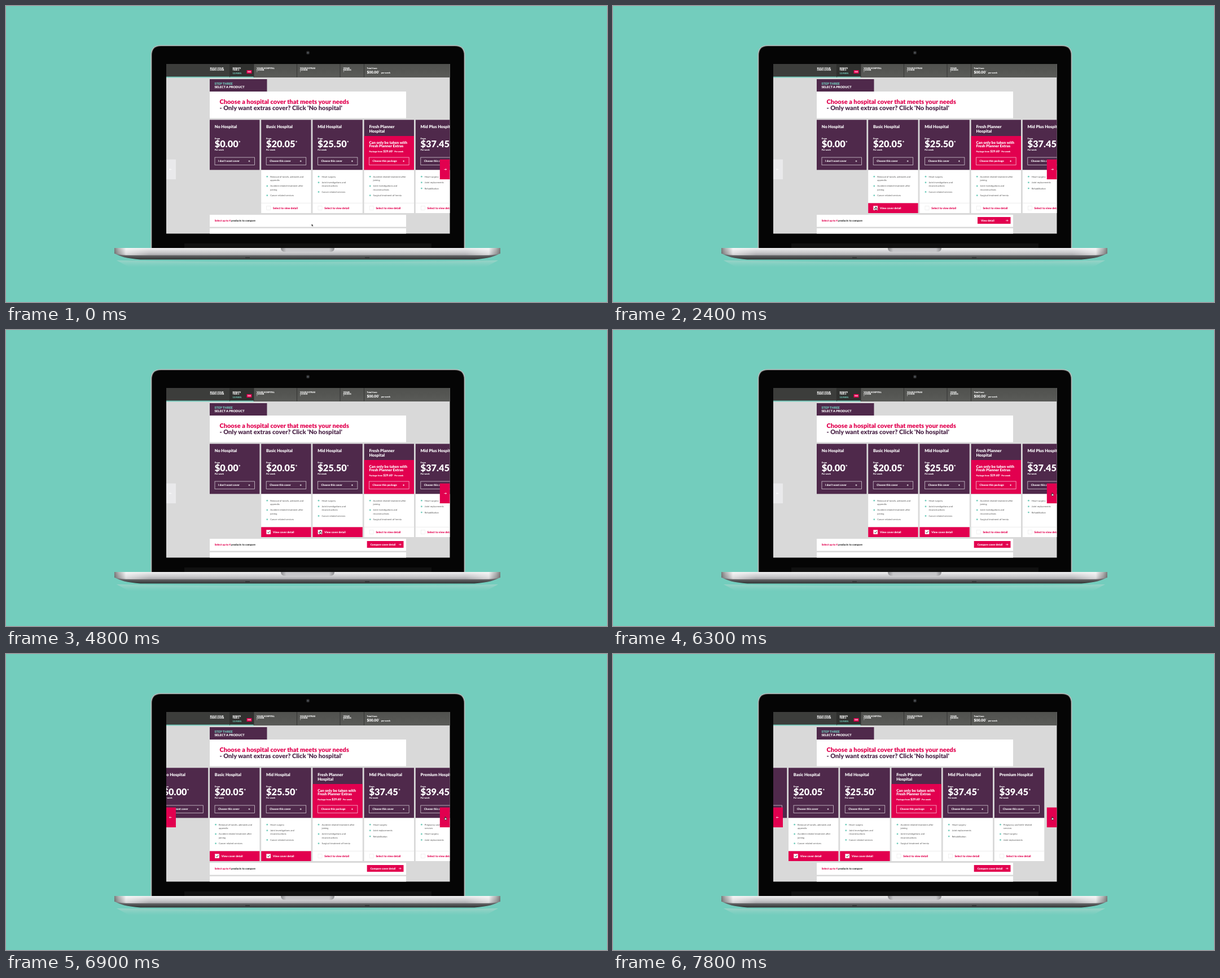
An HTML page for the animation above (8000 ms loop, 1065 by 526 pixels).

```html
<!DOCTYPE html>
<html lang="en">
<head>
<meta charset="utf-8">
<title>Cover picker</title>
<style>
  html, body { margin: 0; width: 100%; height: 100%; overflow: hidden; background: #73cdbd; }
  svg { display: block; }
  text { font-family: Lato, "Open Sans", sans-serif; text-rendering: geometricPrecision; white-space: pre; }
</style>
</head>
<body>
<svg id="stage" width="1065" height="526" viewBox="0 0 1065 526">
  <defs>
    <linearGradient id="metal" x1="0" y1="0" x2="0" y2="1">
      <stop offset="0" stop-color="#f2f2f3"/><stop offset=".3" stop-color="#dcdcde"/>
      <stop offset=".7" stop-color="#c3c3c6"/><stop offset="1" stop-color="#a2a2a6"/>
    </linearGradient>
    <linearGradient id="ends">
      <stop offset="0" stop-color="#555" stop-opacity=".75"/><stop offset=".012" stop-color="#777" stop-opacity=".45"/>
      <stop offset=".03" stop-color="#fff" stop-opacity=".5"/><stop offset=".09" stop-color="#fff" stop-opacity="0"/>
      <stop offset=".91" stop-color="#fff" stop-opacity="0"/><stop offset=".97" stop-color="#fff" stop-opacity=".5"/>
      <stop offset=".988" stop-color="#777" stop-opacity=".45"/><stop offset="1" stop-color="#555" stop-opacity=".75"/>
    </linearGradient>
    <linearGradient id="under" x1="0" y1="0" x2="0" y2="1">
      <stop offset="0" stop-color="#858589"/><stop offset="1" stop-color="#303333"/>
    </linearGradient>
    <linearGradient id="glow" x1="0" y1="0" x2="0" y2="1">
      <stop offset="0" stop-color="#b5d6ce" stop-opacity=".6"/><stop offset="1" stop-color="#9bd8cb" stop-opacity="0"/>
    </linearGradient>
    <linearGradient id="notch">
      <stop offset="0" stop-color="#8b8b8e"/><stop offset=".1" stop-color="#c6c6c9"/>
      <stop offset=".9" stop-color="#c6c6c9"/><stop offset="1" stop-color="#8b8b8e"/>
    </linearGradient>
    <linearGradient id="bar" x1="0" y1="0" x2="0" y2="1">
      <stop offset="0" stop-color="#50514e"/><stop offset="1" stop-color="#5a5b58"/>
    </linearGradient>
    <clipPath id="screen"><rect x="284" y="103" width="502.5" height="301.5"/></clipPath>
  </defs>
  <g id="laptop"></g>
  <g id="page" clip-path="url(#screen)">
    <g id="layout"></g>
    <g id="cards"></g>
    <g id="compare"></g>
    <g id="arrows"></g>
    <g id="pointer"></g>
  </g>
</svg>
<script>
const PINK = '#e2004f', PURPLE = '#4f294b', TEAL = '#73cdbd', WHITE = '#fff';
const LOOP = 8000, STEP = 300, PITCH = 91.2, CARD = 88.4;
const FIRST_CHECK = 1500, SECOND_CHECK = 3600, SLIDE = 6600;

const $ = id => document.getElementById(id);
const rect = (x, y, w, h, fill, extra = '') =>
  `<rect x="${x}" y="${y}" width="${w}" height="${h}" fill="${fill}" ${extra}/>`;
const text = (x, y, size, fill, str, weight = 900) =>
  `<text x="${x}" y="${y}" font-size="${size}" fill="${fill}" font-weight="${weight}">${str}</text>`;
const line = (d, color, width = 0.8) =>
  `<path d="${d}" fill="none" stroke="${color}" stroke-width="${width}"/>`;
const star = size => `<tspan font-size="${size * 0.6}" dy="${-size * 0.25}">*</tspan>`;
const arrow = (x, y, dir, color) =>
  line(`M${x - 2 * dir} ${y}h${4 * dir}m${-1.5 * dir} -1.5l${1.5 * dir} 1.5l${-1.5 * dir} 1.5`, color, 0.75);

// Lid outline: rounded at the top, square where it meets the base.
const lid = (inset, fill) => {
  const left = 256.5 + inset, top = 69.5 + inset, r = 18 - inset;
  return `<path d="M${left} 430V${top + r}q0 ${-r} ${r} ${-r}H${1070 - left - r}q${r} 0 ${r} ${r}V430Z" fill="${fill}"/>`;
};

function drawLaptop() {
  const base = 'M192 430H876V440Q866 443 846 443H222Q202 443 192 440Z';
  return lid(0, '#b4b9b8') + lid(1.6, '#2a2b2b') + lid(2.6, '#050505')
    + rect(316, 422, 438, 8, '#101010')
    + '<circle cx="535" cy="83" r="3.2" fill="#262626"/><circle cx="535" cy="83" r="1.5" fill="#555b62"/>'
    + '<path d="M196 452Q535 458 872 452L850 464H218Z" fill="url(#glow)"/>'
    + '<path d="M192 439Q204 448 238 450.5H830Q864 448 876 439Z" fill="url(#under)"/>'
    + `<path d="${base}" fill="url(#metal)"/><path d="${base}" fill="url(#ends)"/>`
    + '<path d="M487 430H582Q582 437 574 437H495Q487 437 487 430Z" fill="url(#notch)"/>'
    + rect(424, 446.5, 8, 1.5, '#2c2f2f') + rect(636, 446.5, 8, 1.5, '#2c2f2f');
}

function drawLayout() {
  const labels = [
    [361.5, 'BUILD YOUR', 'OWN COVER'], [401.5, 'REBATE', 'TIER 2'],
    [444, 'YOUR HOSPITAL', 'COVER', '*'], [520.8, 'YOUR EXTRAS', 'COVER', '*'],
    [597.5, 'YOUR', 'EXCESS', '*']
  ];
  let out = rect(284, 103, 503, 302, '#d9d9d9')
    + rect(284, 103, 503, 24, 'url(#bar)')
    + rect(284, 103, 112.5, 23, '#3c3d3b') + rect(396.5, 103, 42.5, 23, '#30312f')
    + rect(284, 125.5, 155, 1.8, TEAL);
  for (const x of [396.5, 439, 515.5, 592, 634.5]) out += line(`M${x} 103V126.5`, '#2c2d2b', 0.8);
  for (const [x, ...rows] of labels)
    rows.forEach((row, i) => out += text(x, 111.5 + i * 3.8, 4, WHITE, row));
  out += text(401.5, 120.6, 4, TEAL, '13.985%')
    + rect(426.5, 114, 9, 6, PINK) + text(428.2, 118.3, 3.4, WHITE, 'Edit')
    + text(639.5, 111.5, 3.9, WHITE, 'Total from')
    + text(639.5, 119.8, 6.5, WHITE, '$00.00' + star(6.5))
    + text(664.8, 119.8, 3.9, WHITE, 'per week')
    + rect(361, 130, 101.5, 22, PURPLE)
    + text(369.5, 140.3, 5.65, TEAL, 'STEP THREE') + text(369.5, 145.8, 5.65, WHITE, 'SELECT A PRODUCT')
    + rect(361, 152, 348, 47.3, WHITE)
    + text(378.5, 174, 11, PINK, 'Choose a hospital cover that meets your needs')
    + text(378.5, 185, 11, PURPLE, "- Only want extras cover? Click 'No hospital'")
    + rect(361, 371, 348, 21.5, WHITE) + rect(361, 395, 348, 12, WHITE)
    + text(369.8, 382.8, 4.6, PINK, 'Select up to 4<tspan fill="#333"> products to compare</tspan>');
  return out;
}

const plans = [
  { title: ['No Hospital'], price: '$0.00', action: "I don't want cover" },
  { title: ['Basic Hospital'], price: '$20.05', checkAt: FIRST_CHECK,
    items: ['Removal of tonsils, adenoids and|appendix', 'Accident related treatment after|joining', 'Cancer related services'] },
  { title: ['Mid Hospital'], price: '$25.50', checkAt: SECOND_CHECK,
    items: ['Heart surgery', 'Joint investigations and|reconstructions', 'Cancer related services'] },
  { title: ['Fresh Planner', 'Hospital'], package: '$29.60', action: 'Choose this package',
    items: ['Accident related treatment after|joining', 'Joint investigations and|reconstructions', 'Surgical treatment of hernia'] },
  { title: ['Mid Plus Hospital'], price: '$37.45',
    items: ['Heart surgery', 'Joint replacements', 'Rehabilitation'] },
  { title: ['Premium Hospital'], price: '$39.45',
    items: ['Pregnancy and birth-related|services', 'Heart surgery', 'Joint replacements'] }
];

function drawOffer(plan) {
  if (plan.package) return rect(0, 231, CARD, 60.3, PINK)
    + text(8.8, 245.4, 6.6, WHITE, 'Can only be taken with')
    + text(8.8, 251.4, 6.6, WHITE, 'Fresh Planner Extras')
    + text(8.8, 260.4, 3.85, WHITE, 'Package from')
    + text(33.8, 260.4, 5.2, WHITE, plan.package + star(5.2))
    + text(53.6, 260.4, 3.85, WHITE, 'Per week');
  return text(8.8, 237, 4, WHITE, 'From')
    + text(8.8, 251, 16.4, WHITE, plan.price + '<tspan font-size="8.5" dy="-4.6" dx=".3">*</tspan>')
    + text(8.8, 257, 3.85, WHITE, 'Per week');
}

function drawItems(items) {
  let y = 304.6, out = '';
  for (const item of items) {
    out += `<circle cx="10.6" cy="${y - 1.4}" r="1.4" fill="${TEAL}"/>`;
    item.split('|').forEach((row, i) => {
      if (i) y += 6.3;
      out += text(16, y, 4.15, '#555', row, 400);
    });
    y += 10.45;
  }
  return out;
}

function drawFooter(checked) {
  const box = (fill, stroke) => rect(9.6, 355.6, 7, 7, fill, `stroke="${stroke}" stroke-width=".6"`);
  return checked
    ? rect(0, 350.3, CARD, 17.7, PINK) + box(WHITE, WHITE)
      + line('M11.2 359.2l1.4 1.6l2.7 -3.5', '#333', 0.9) + text(20.8, 360.8, 4.85, WHITE, 'View cover detail')
    : line(`M0 350.2H${CARD}`, '#e4e4e4', 0.7) + box(WHITE, '#e6e6e6')
      + text(20.8, 360.8, 4.85, PINK, 'Select to view detail');
}

function drawCard(plan, index) {
  let out = `<g transform="translate(${361 + index * PITCH} 0)">` + rect(0, 202.3, CARD, 89, PURPLE);
  plan.title.forEach((row, i) => out += text(8.8, 217.4 + i * 7.6, 7.35, WHITE, row));
  out += drawOffer(plan)
    + rect(9, 269, 70.5, 13.4, 'none', 'stroke="#fff" stroke-opacity=".75" stroke-width=".8"')
    + text(15, 277.3, 4.7, WHITE, plan.action || 'Choose this cover')
    + line('M68.5 275.7h3m-1.5 -1.5v3', WHITE, 0.75);
  if (plan.items) {
    out += rect(0, 291.6, CARD, 76.4, WHITE) + drawItems(plan.items) + drawFooter(false);
    if (plan.checkAt) out += `<g class="checked" data-at="${plan.checkAt}">${drawFooter(true)}</g>`;
  }
  return out + '</g>';
}

const drawButton = (id, x, label) => `<g id="${id}">` + rect(x, 375, 704.5 - x, 12, PINK)
  + text(x + 6, 382.8, 4.7, WHITE, label) + arrow(698, 381.2, 1, WHITE) + '</g>';

const drawArrows = () =>
  `<g id="backOff">${rect(284, 272.7, 17, 35.3, '#e9e9eb')}${arrow(291.5, 290.4, -1, WHITE)}</g>`
  + `<g id="backOn">${rect(284, 272.7, 17, 35.3, PINK)}${arrow(291.5, 290.4, -1, WHITE)}</g>`
  + rect(768.8, 272.7, 18, 35.3, PINK) + `<g id="next">${arrow(778.4, 290.4, 1, WHITE)}</g>`;

$('laptop').innerHTML = drawLaptop();
$('layout').innerHTML = drawLayout();
$('cards').innerHTML = plans.map(drawCard).join('');
$('compare').innerHTML = drawButton('viewOne', 646, 'View detail') + drawButton('viewMany', 639.7, 'Compare cover detail');
$('arrows').innerHTML = drawArrows();
$('pointer').innerHTML =
  '<path id="tip" d="M0 0V4.2L1 3.4L1.7 4.8L2.4 4.5L1.8 3.1H3Z" fill="#111" stroke="#fff" stroke-width=".25"/>'
  + '<path id="hand" d="M-.5 -2.2H.4V-.4L2.2 .1V1.8L1.6 3.2H-.8L-2 1V.2L-.5 .7Z" fill="#fff" stroke="#222" stroke-width=".8"/>';

const smooth = p => { p = Math.min(1, Math.max(0, p)); return p * p * (3 - 2 * p); };
const show = (el, on) => el.setAttribute('visibility', on ? 'visible' : 'hidden');

// Each move: start, end, destination.
const start = [541.6, 387.2];
const moves = [[0, 1200, [465.6, 359.4]], [2400, 3300, [556.8, 359.4]], [4800, 6150, [778.6, 291.6]]];

function pointerAt(t) {
  let [x, y] = start, resting = false;
  for (const [from, to, [tx, ty]] of moves) {
    if (t <= from) break;
    const p = smooth((t - from) / (to - from));
    x += (tx - x) * p;
    y += (ty - y) * p;
    resting = p > 0.95;
  }
  return { x, y, resting };
}

function render(time) {
  const t = Math.floor((time % LOOP) / STEP) * STEP;
  const scroll = PITCH * (smooth((t - 6300) / 580) + smooth((t - 7500) / 564));
  $('cards').setAttribute('transform', `translate(${-scroll} 0)`);
  document.querySelectorAll('.checked').forEach(el => show(el, t >= +el.dataset.at));
  show($('viewOne'), t >= FIRST_CHECK && t < SECOND_CHECK);
  show($('viewMany'), t >= SECOND_CHECK);
  show($('backOff'), t < SLIDE);
  show($('backOn'), t >= SLIDE);

  const { x, y, resting } = pointerAt(t);
  $('pointer').setAttribute('transform', `translate(${x} ${y})`);
  show($('tip'), !resting);
  show($('hand'), resting);
  show($('next'), t < 6300);
}

let origin;
function tick(now) {
  origin ??= now;
  render(now - origin);
  requestAnimationFrame(tick);
}
render(0);
requestAnimationFrame(tick);
</script>
</body>
</html>
```
